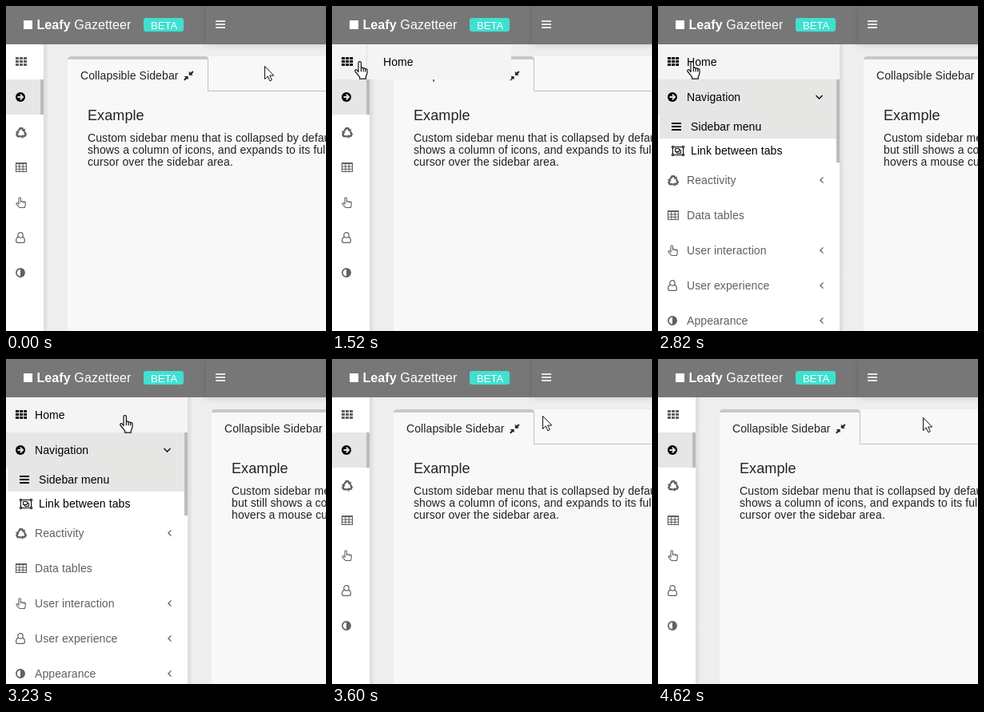
An HTML page that plays this animation: 400x407 px, repeating every 6330 ms.

```html
<!DOCTYPE html>
<html lang="en">
<head>
<meta charset="utf-8">
<title>Collapsible sidebar</title>
<style>
  html, body { margin: 0; width: 100%; height: 100%; overflow: hidden; background: #eee; }
  svg { display: block; }
  text { font: 14px "Liberation Sans", Arial, sans-serif; letter-spacing: .1px; fill: currentColor; stroke: none; }
  .icon { fill: none; stroke: currentColor; }
  .solid { fill: currentColor; stroke: none; }
  .cursor { fill: #fff; stroke: #111; stroke-linejoin: round; }
  .raised { filter: drop-shadow(0 1px 4px rgba(0, 0, 0, .12)); }
</style>
</head>
<body>
<svg width="400" height="407" viewBox="0 0 400 407">
  <defs>
    <linearGradient id="across"><stop stop-opacity=".08"/><stop offset="1" stop-opacity="0"/></linearGradient>
    <g id="grid"><path stroke-width="3" stroke-dasharray="4 1" d="M0 2.5h14M0 6.5h14M0 10.5h14"/></g>
    <g id="go"><circle class="solid" cx="6" cy="7" r="6"/><path stroke="#e6e6e5" stroke-width="1.8" d="M2.5 7h6.5M5.8 3.7L9.1 7l-3.3 3.3"/></g>
    <g id="arm"><path stroke-width="2.4" d="M3.6 5.4l2-3.2h2.6l1.5 2.4"/><path class="solid" d="M11.8 2.2v4.4l-4-1z"/></g>
    <g id="cycle"><use href="#arm"/><use href="#arm" transform="rotate(120 7 8)"/><use href="#arm" transform="rotate(240 7 8)"/></g>
    <g id="table"><path stroke-width="1.1" d="M.5 1.5h13v11H.5zM.5 2.5h13M.5 6h13M.5 9.3h13M4.8 3v9.5M9.2 3v9.5"/></g>
    <g id="point"><path stroke-width="1.1" d="M4 9V2a1.2 1.2 0 0 1 2.4 0v4a1.1 1.1 0 0 1 2 .3 1.1 1.1 0 0 1 2 .5 1 1 0 0 1 1.9.8v2.2l-.9 3.7H5L1.2 9.4a1.1 1.1 0 0 1 1.7-1.4z"/></g>
    <g id="user"><path stroke-width="1.2" d="M6 .7a3.2 3.2 0 0 1 0 6.4 3.2 3.2 0 0 1 0-6.4M3.4 6.4C1.4 6.8.6 9 .6 11c0 1.4.8 2.4 2 2.4h6.8c1.2 0 2-1 2-2.4 0-2-.8-4.2-2.8-4.6"/></g>
    <g id="half"><circle cx="6" cy="7" r="5.1" stroke-width="1.7"/><path class="solid" d="M6 2a5 5 0 0 1 0 10z"/></g>
    <g id="bars"><path stroke-width="2" d="M0 3h12M0 7h12M0 11h12"/></g>
    <g id="group"><path d="M2 2.5h12M2 12.5h12M1.5 3v9M14.5 3v9M4.5 4.5h5v4h-5zM9.5 6.5h2v4h-5v-2"/>
      <path fill="#fff" d="M.5 1.5h2v2h-2zM13.5 1.5h2v2h-2zM.5 11.5h2v2h-2zM13.5 11.5h2v2h-2z"/></g>
    <g id="left"><path stroke-width="1.3" d="M6 3.4L2.4 7 6 10.6"/></g>
    <g id="fold"><path stroke-width="1.3" d="M-3 5l4 4 4-4"/></g>
    <g id="shrink"><path class="solid" d="M6.8 1.8v5h5zM5.6 12.2V8h-5z"/><path stroke-width="2" d="M8 5.8l3.8-3.8M4.6 9L.8 12.8"/></g>
  </defs>
  <g id="scene"></g>
  <path id="arrow" class="cursor" d="M.5.5v16l3.7-3.5 2.6 5.8 2.5-1.1-2.6-5.6h5z"/>
  <path id="hand" class="cursor" stroke-width="1.2" d="M5 13.5V2.4a1.7 1.7 0 0 1 3.4 0v6.4a1.5 1.5 0 0 1 2.7.6 1.5 1.5 0 0 1 2.6.7 1.3 1.3 0 0 1 2.3.9v4.6l-1.7 4v2.6H6.6v-2.4L1 13c-1-1.7.9-3 2.1-1.8zM8.4 8.8v4.4M11.1 9.4v3.8M13.7 10.1v3.3"/>
</svg>
<script>
const LOOP = 6330, TICK = 80;
const $ = id => document.getElementById(id);
const linear = p => p;
const easeIn = k => p => p ** k;
const easeOut = k => p => 1 - (1 - p) ** k;

// Cursor key points: ms, x, y and the easing towards the next one
const keys = [
  [0, 323, 75, () => 0],
  [440, 323, 75, easeIn(3.5)],
  [1080, 78, 70, linear],
  [1140, 30, 71, linear],
  [1520, 28, 69, linear],
  [1600, 20, 69, () => 0],
  [2740, 20, 69, easeIn(1.15)],
  [3460, 214, 70, linear],
  [3520, 243, 71, easeOut(3.4)],
  [4620, 331, 73, linear]
];

// The pointer is sampled in ticks, so it moves in small jumps
function pointer(t) {
  const i = keys.findLastIndex(k => k[0] <= t);
  const [t0, x0, y0, ease] = keys[i];
  const [t1, x1, y1] = keys[i + 1] || [LOOP, x0, y0];
  const p = ease(Math.floor((t - t0) / TICK) * TICK / (t1 - t0));
  return [x0 + (x1 - x0) * p, y0 + (y1 - y0) * p].map(Math.round);
}

const menu = [
  ['Home', 'grid'], ['Navigation', 'go', 'fold'], ['Reactivity', 'cycle', 'left'], ['Data tables', 'table'],
  ['User interaction', 'point', 'left'], ['User experience', 'user', 'left'], ['Appearance', 'half', 'left']
];
const notes = {
  narrow: ['Custom sidebar menu that is collapsed', 'but still shows a column of icons', 'hovers a mouse cursor over'],
  wide: ['Custom sidebar menu that is collapsed by default, but still',
    'shows a column of icons, and expands to its full width', 'cursor over the sidebar area.']
};

const box = (x, y, w, h, fill) => `<rect x="${x}" y="${y}" width="${w}" height="${h}" fill="${fill}"/>`;
const text = (x, y, s, size = 14) => `<text x="${x}" y="${y}" style="font-size:${size}px">${s}</text>`;
const icon = (id, x, mid) => `<use href="#${id}" class="icon" x="${x}" y="${mid - 7}"/>`;

function header() {
  return `${box(0, 0, 255, 48, '#777')}<g class="raised">${box(250, 0, 160, 48, '#777')}</g>
    <g color="#fff">${box(22, 18, 11, 11, '#fff')}
    ${text(38.5, 29, '<tspan font-weight="bold">Leafy</tspan> Gazetteer', 16)}
    <rect x="172" y="15" width="50" height="17" rx="3" fill="#40e0d0"/>${text(181, 29, 'BETA', 13)}</g>
    <g color="#e6e6e6">${icon('bars', 262, 23)}</g>`;
}

function panel(open, tabHover) {
  const lines = open ? notes.narrow : notes.wide;
  return `<g transform="translate(${open ? 257 : 77} 63)" color="#222">
    ${box(0, 0, 400, 348, '#f8f8f8')}
    <path fill="#c8c8c8" d="M0 4a4 4 0 0 1 4-4h168a4 4 0 0 1 4 4z"/>
    <path fill="none" stroke="#c0c0c0" d="M175.5 3v40.5H400${tabHover ? 'M.5 3v40' : ''}"/>
    ${text(16, 29, 'Collapsible Sidebar')}${icon('shrink', 145, 24)}${text(25, 80, 'Example', 18)}
    ${lines.map((line, i) => text(25, 107 + 15 * i, line)).join('')}</g>`;
}

function sidebar(open, hover) {
  const w = open ? 227 : 47;
  let s = box(w, 48, 7, 359, 'url(#across)') + box(0, 48, w, 359, '#fff');
  if (hover) s += box(0, 48, w, 44, '#f4f4f4');
  s += box(0, 92, w - 4, 44, '#e6e6e5') + box(w - 4, 92, 4, open ? 104 : 44, '#bbb');
  menu.forEach(([name, id, mark], i) => {
    const mid = 70 + 44 * i + (open && i > 1 ? 60 : 0);
    const strong = i == 1 || (i == 0 && hover);
    s += `<g color="${strong ? '#000' : '#606060'}">${icon(id, 12, mid)}`;
    if (open) s += text(36, mid + 5, name) + (mark ? icon(mark, 200.5, mid) : '');
    s += '</g>';
  });
  if (open) {
    s += box(2, 136, 221, 30, '#e6e6e5') + icon('bars', 17, 151) + text(41, 156, 'Sidebar menu')
       + icon('group', 17, 181) + text(41, 186, 'Link between tabs');
  } else if (hover) {
    s += box(43, 48, 1, 44, '#e0e0e0') + box(44, 48, 180, 44, '#f4f4f4') + text(64, 75, 'Home');
  }
  return s;
}

let shown;
function frame() {
  const t = (performance.now() - start) % LOOP;
  const open = t >= 1600 && t < 3600;
  const hover = t >= 1140 && t < 3520;
  const [x, y] = pointer(t);
  const tabHover = t < 1060 && x < 253;
  const key = [open, hover, tabHover].join();
  if (key != shown) {
    shown = key;
    $('scene').innerHTML = box(0, 0, 400, 407, '#eee') + panel(open, tabHover) + header() + sidebar(open, hover);
  }
  for (const id of ['arrow', 'hand']) {
    $(id).setAttribute('transform', `translate(${x} ${y})`);
    $(id).style.display = (id == 'hand') == hover ? '' : 'none';
  }
  requestAnimationFrame(frame);
}
const start = performance.now();
frame();
</script>
</body>
</html>
```
